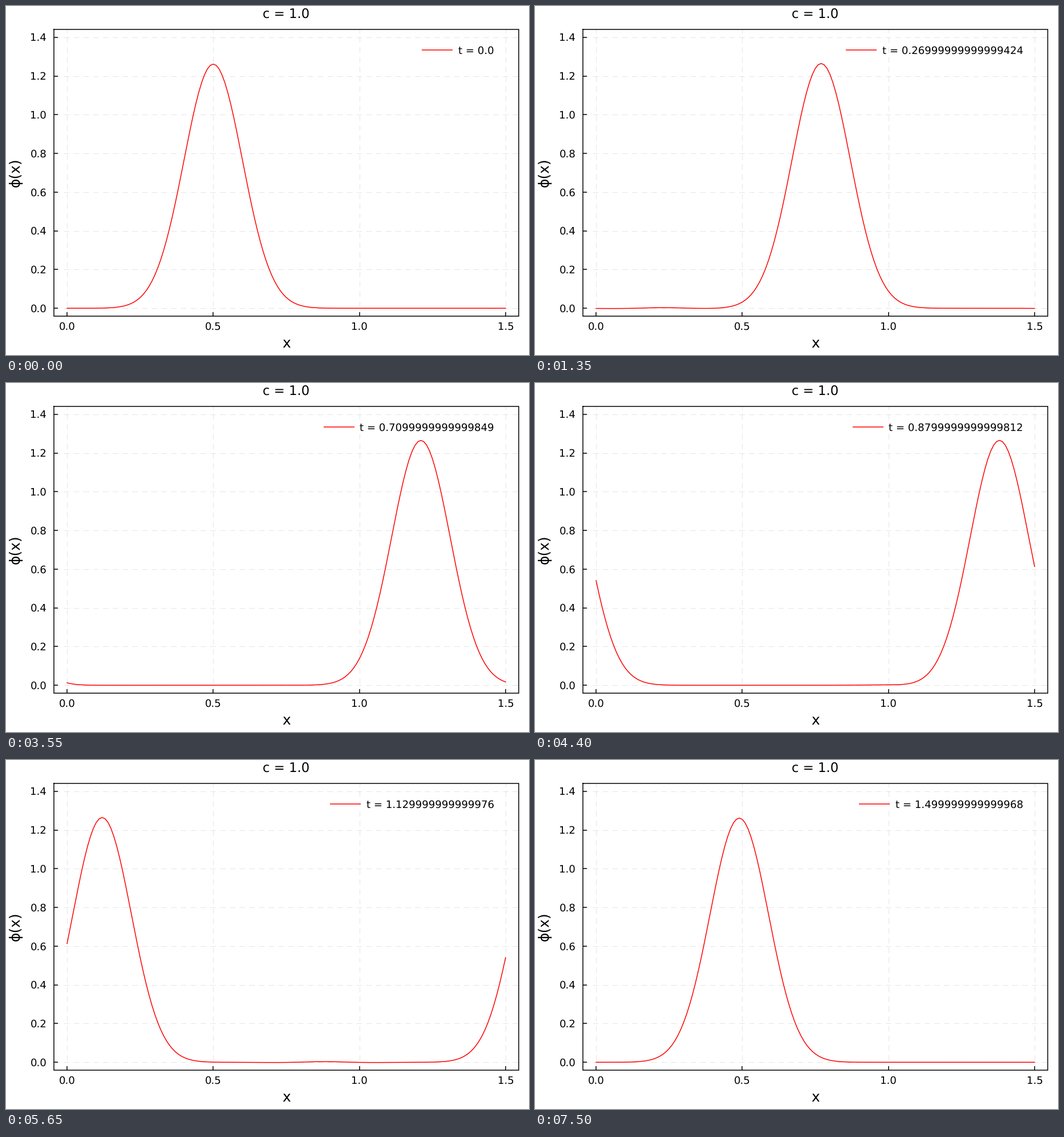
A matplotlib script for the animation above (7.55 s loop, 917 by 611 pixels).

```python
import numpy as np
import matplotlib.pyplot as plt
from matplotlib.animation import FuncAnimation

W, H, DPI = 917, 611, 64
PT = 72 / DPI  # points per pixel
plt.rcParams.update({"font.family": "DejaVu Sans", "text.hinting": "none"})

LEFT, RIGHT, TOP, BOTTOM = 84.0, 899.0, 40.6, 543.4
EM = 18.1
STEPS = 151
DT = 1.13 - 1.12  # rounding error shows in the time label


def px(x):
    return LEFT + (x + 0.045) / 1.59 * (RIGHT - LEFT)


def py(y):
    return BOTTOM - (y + 0.042) / 1.484 * (BOTTOM - TOP)


def leapfrog(first):
    """Periodic advection at Courant number 1, started with an Euler step."""
    def slope(u):
        return np.roll(u, -1) - np.roll(u, 1)

    states = [first, first - slope(first) / 2]
    while len(states) < STEPS:
        states.append(states[-2] - slope(states[-1]))
    return states


x = np.linspace(0, 1.5, 151)
waves = leapfrog(np.exp(-(x - 0.5) ** 2 / 0.02) / np.sqrt(0.2 * np.pi))

fig = plt.figure(figsize=(W / DPI, H / DPI), dpi=DPI, facecolor="white")
ax = fig.add_axes([0, 0, 1, 1])
ax.set_xlim(0, W)
ax.set_ylim(H, 0)
ax.axis("off")


def line(xs, ys, color="black", width=1.5, **kw):
    return ax.plot(xs, ys, color=color, lw=width * PT, **kw)[0]


def label(x, y, s, size=EM, ha="center", va="baseline", **kw):
    return ax.text(x, y, s, fontsize=size * PT, ha=ha, va=va, **kw)


def grid(xs, ys):
    line(xs, ys, alpha=0.1, width=1, dashes=(9.8, 7.3), dash_capstyle="butt")


for v in np.arange(4) * 0.5:
    grid([px(v)] * 2, [BOTTOM, TOP])
    line([px(v)] * 2, [BOTTOM, BOTTOM - 7], solid_capstyle="butt")
    label(px(v), 567, f"{v:.1f}")
for v in np.arange(8) * 0.2:
    grid([LEFT, RIGHT], [py(v)] * 2)
    line([LEFT, LEFT + 7], [py(v)] * 2, solid_capstyle="butt")
    label(71.3, py(v) + 6.6, f"{v:.1f}", ha="right")

line([LEFT, RIGHT, RIGHT, LEFT, LEFT], [TOP, TOP, BOTTOM, BOTTOM, TOP],
     solid_joinstyle="miter", solid_capstyle="projecting")
label(491.5, 20.3, "c = 1.0", 22.7)
label(491.5, 598, "x", 25)
label(17, 291.5, "\u03d5(x)", 25, va="center", rotation=90)

curve = line(px(x), py(waves[0]), "red", solid_joinstyle="round")
key = line([730, 784], [77, 77], "red", solid_capstyle="butt")
clock = label(793, 83.6, "", ha="left")


def draw(i):
    text = str(i * DT)
    start = 855 - EM * (2.184 + 0.636 * (len(text) - 1))
    curve.set_ydata(py(waves[i]))
    key.set_xdata([start - 63, start - 9])
    clock.set_x(start + 0.3)
    clock.set_text("t = " + text)
    return curve, key, clock


anim = FuncAnimation(fig, draw, frames=STEPS, interval=50, repeat=True,
                     repeat_delay=0, blit=False)
plt.show()
```
